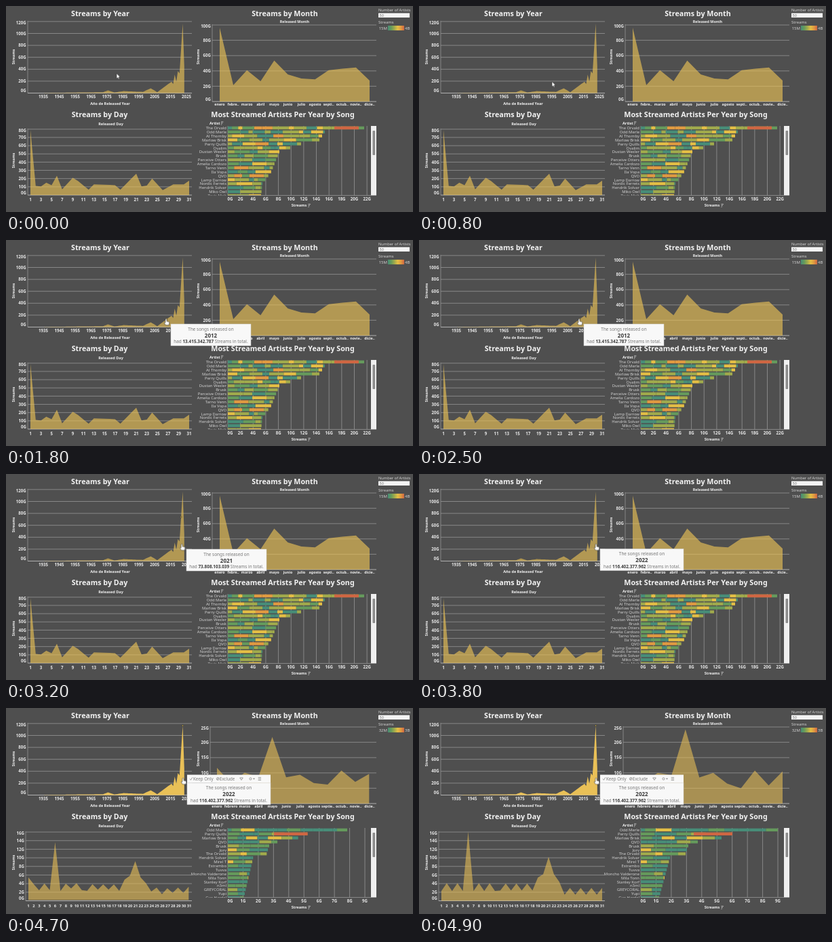
These frames come from a looping animation (600 px wide and 304 px high, 5000 ms). An HTML page:

```html
<!DOCTYPE html>
<html lang="en">
<head>
<meta charset="utf-8">
<title>Streams dashboard</title>
<style>
html, body { margin: 0; width: 100%; height: 100%; overflow: hidden; background: #4f4f4f; }
svg { display: block; width: 600px; height: 304px; font-family: "Noto Sans", "Open Sans", sans-serif; }
text { fill: #e8e8e8; }
.b { font-weight: 700; fill: #f2f2f2; }
.m { font-weight: 600; }
.dim { fill: #d2d2d2; }
.grid { stroke: #a0a0a0; stroke-width: .7; }
.axis { stroke: #c9c9c9; stroke-width: .8; }
.area { fill: #e9c057; fill-opacity: .65; }
.tip text { fill: #777; }
.tip .b { fill: #3c3c3c; }

#year { animation: lit 5s step-end infinite; }
.morph { animation: morph 5s linear infinite; }
.s0, .s1, .s2, .s01, .s12, .t1, .t2, .t3, .bar, .arrow, .hand { animation: 5s step-end infinite; }
.s0 { animation-name: s0; }
.s1 { animation-name: s1; }
.s2 { animation-name: s2; }
.s01 { animation-name: s01; }
.s12 { animation-name: s12; }
.t1 { animation-name: t1; }
.t2 { animation-name: t2; }
.t3 { animation-name: t3; }
.bar { animation-name: bar; }
.arrow { animation-name: arrow; }
.hand { animation-name: hand; }
.grow { transform-origin: 327px 0; animation: grow 5s ease-out infinite; }
#cursor { animation: move 5s linear infinite; }

@keyframes lit { 0% { fill-opacity: .65 } 90%, 100% { fill-opacity: 1 } }
@keyframes morph {
  0%, 85.9% { d: var(--p0); fill-opacity: .65 }
  85.95%, 88% { d: var(--p1); fill-opacity: .65; animation-timing-function: ease-in-out }
  97%, 100% { d: var(--p2); fill-opacity: .58 }
}
@keyframes s0 { 0% { opacity: 1 } 85.9%, 100% { opacity: 0 } }
@keyframes s1 { 0% { opacity: 0 } 85.9% { opacity: 1 } 92%, 100% { opacity: 0 } }
@keyframes s2 { 0% { opacity: 0 } 92%, 100% { opacity: 1 } }
@keyframes s01 { 0% { opacity: 1 } 92%, 100% { opacity: 0 } }
@keyframes s12 { 0% { opacity: 0 } 85.9%, 100% { opacity: 1 } }
@keyframes t1 { 0% { opacity: 0 } 31% { opacity: 1 } 58%, 100% { opacity: 0 } }
@keyframes t2 { 0% { opacity: 0 } 60% { opacity: 1 } 70%, 100% { opacity: 0 } }
@keyframes t3 { 0% { opacity: 0 } 70%, 100% { opacity: 1 } }
@keyframes bar { 0% { opacity: 0 } 90%, 100% { opacity: 1 } }
@keyframes arrow { 0% { opacity: 1 } 30%, 100% { opacity: 0 } }
@keyframes hand { 0% { opacity: 0 } 30%, 100% { opacity: 1 } }
@keyframes grow { 0%, 92% { transform: scaleX(.7) } 97%, 100% { transform: none } }
@keyframes move {
  0% { transform: translate(163px, 99.5px) }
  16% { transform: translate(196px, 111.5px) }
  30%, 54% { transform: translate(236px, 116.5px) }
  63% { transform: translate(259px, 103.5px) }
  72%, 100% { transform: translate(261px, 103.5px) }
}
</style>
</head>
<body>
<svg id="stage" viewBox="0 0 600 304"></svg>
<script>
const txt = (x, y, s, size = 6.1, cls = 'm', anchor = 'middle') =>
  `<text x="${x}" y="${y + size * .36}" font-size="${size}" class="${cls}" text-anchor="${anchor}">${s}</text>`;
const title = (x, y, s) => txt(x, y, s, 10.73, 'b');
const side = (x, y) => `<g transform="translate(${x} ${y}) rotate(-90)">${txt(0, 0, 'Streams', 5.5, 'b')}</g>`;
const line = (x1, y1, x2, y2, cls = 'grid') => `<path class="${cls}" d="M${x1} ${y1}L${x2} ${y2}"/>`;
const box = (x, y, w, h, fill, extra = '') =>
  `<rect x="${x}" y="${y}" width="${w}" height="${h}" fill="${fill}" ${extra}/>`;
const group = (cls, body) => `<g class="${cls}">${body}</g>`;
const list = (n, f) => Array.from({ length: n }, (_, i) => f(i));
const range = (n, f) => list(n, f).join('');

// Value at x on the straight lines between key points [x, value].
function between(keys, x) {
  const i = Math.max(1, keys.findIndex(k => k[0] >= x));
  const [x0, v0] = keys[i - 1], [x1, v1] = keys[i];
  return v0 + (v1 - v0) * (x - x0) / (x1 - x0);
}

function seeded(seed) {
  return () => (seed = (seed * 16807) % 2147483647) / 2147483647;
}

// Horizontal grid with labels; the end labels sit inside the plot.
function yAxis(x1, x2, y0, gap, n, step, labelX) {
  return range(n + 1, i => {
    const y = y0 - i * gap, shift = i === 0 ? -3.5 : i === n ? 2 : 0;
    return line(x1, y, x2, y, i ? 'grid' : 'axis') + txt(labelX, y + shift, i * step + 'G', 6.1, 'm', 'end');
  }) + line(x1, y0, x1, y0 - n * gap - 1);
}

function areaPath(values, x1, x2, y0, k) {
  const step = (x2 - x1) / (values.length - 1);
  const pts = values.map((v, i) => `L${(x1 + i * step).toFixed(1)} ${(y0 - v * k).toFixed(1)}`);
  return `M${x1} ${y0}${pts.join('')}L${x2} ${y0}Z`;
}
const morph = paths =>
  `<path class="area morph" d="${paths[0]}" style="${paths.map((p, i) => `--p${i}:path('${p}')`).join(';')}"/>`;

function yearChart() {
  const keys = [[1935, .3], [1972, 1.5], [1975, 4.5], [1979, 1], [1985, 3.3], [1997, 2], [2002, 8],
    [2006, 1.5], [2012, 13.4], [2015, 19], [2016, 15], [2017, 31], [2018, 19], [2019, 37], [2020, 33],
    [2021, 73.8], [2022, 116.4], [2023, 45]];
  const d = areaPath(list(89, i => between(keys, 1935 + i)), 56.4, 262.8, 128.5, .88);
  return title(139, 10.9, 'Streams by Year') + side(11.5, 75) +
    yAxis(32, 274, 128.5, 17.6, 6, 20, 29.7) + `<path id="year" class="area" d="${d}"/>` +
    range(10, i => txt(55 + i * 23.45, 134, 1935 + i * 10)) +
    txt(153.5, 144, 'Año de Released Year', 5.5, 'b');
}

function monthChart() {
  const short = 'enero febre.. marzo abril mayo junio julio agosto septi.. octub.. novie.. dicie..'.split(' ');
  const long = 'enero febrero marzo abril mayo junio julio agosto septie.. octub.. novie.. dicie..'.split(' ');
  const all = [96.5, 21.5, 41, 26.5, 53.5, 35.5, 30, 29, 41, 43, 44.5, 27.5];
  const one = [8, 7, 10, 9.3, 24.2, 8.5, 10, 6.5, 5, 10.8, 5.9, 10.5];
  const part = (cls, left, x1, x2, step, names) => group(cls,
    yAxis(left, x2 + 10, 141, 22.6, 5, step, left - 2) +
    range(12, i => txt(x1 + i * (x2 - x1) / 11, 145.2, names[i], 5.3, 'b')));
  return title(411, 10.9, 'Streams by Month') + txt(425.5, 23.5, 'Released Month', 5.4, 'b') + side(283, 75) +
    part('s0', 304, 315, 536, 20, short) + part('s1', 301, 311, 533, 20, short) +
    part('s2', 301, 311, 536, 5, long) +
    morph([areaPath(all, 315, 536, 141, 1.13), areaPath(all, 311, 533, 141, 1.13),
      areaPath(one, 311, 536, 141, 4.52)]);
}

function dayChart() {
  const keys = [[1, 79], [2, 11], [3, 10.5], [4, 15], [5, 12], [6, 23.5], [7, 7], [9, 21], [10, 17], [12, 6.5],
    [13, 13], [17, 12], [18, 6.5], [21, 26], [22, 10.5], [23, 11.5], [24, 20], [26, 6], [28, 13], [30, 13], [31, 17.5]];
  const all = list(31, i => between(keys, i + 1));
  // A zigzag with one sharp spike and one wide bump.
  const one = list(31, i => {
    const zig = (i % 2 ? 1 : -1) * (i < 11 ? .9 : -.8);
    const bump = Math.max(0, 6.2 - 2.4 * Math.abs(i - 20));
    return (i < 22 ? 3.2 : 2.2) + zig + bump + (i === 5 ? 12 : 0);
  });
  const odd = x => range(16, i => txt(x + i * 15.6, 286, i * 2 + 1));
  return title(138, 160.5, 'Streams by Day') + txt(154.5, 174, 'Released Day', 5.5, 'b') + side(11.5, 228) +
    group('s0', yAxis(32, 274, 279, 12.15, 8, 10, 30) + odd(36)) +
    group('s1', yAxis(29, 271, 279, 12.15, 8, 10, 30) + odd(33)) +
    group('s2', yAxis(29, 274, 284.5, 12.68, 8, 2, 27) + range(31, i => txt(33 + i * 7.9, 291.5, i + 1, 5.8))) +
    morph([areaPath(all, 36, 270, 279, 1.215), areaPath(all, 33, 267, 279, 1.215),
      areaPath(one, 33, 270, 284.5, 6.34)]);
}

const hues = { t: '#478d78', g: '#659a5c', l: '#a0aa4c', y: '#e3be45', o: '#e09a41', r: '#cf6643' };
const allTime = {
  names: ['The Orvald', 'Odd Merle', 'Al Thornby', 'Marlow Brisk', 'Perry Quills', 'Ovalim', 'Dustan Wexler',
    'Brusk', 'Perceive Otters', 'Amelia Cardozo', 'Tarno Venn', 'Ila Vopa', 'QVO', 'Lamp Darrow',
    'Nordic Ferrets', 'Hendrik Solvar', 'Miko Owl', 'Tavis Molt'],
  widths: [[0, 201], [1, 143], [3, 135], [4, 108], [6, 76], [11, 64], [14, 51], [17, 49]],
  mix: 'tttggglllyyyo', seed: 77, hot: { row: 0, from: 157, to: 193 }
};
const oneYear = {
  names: ['Odd Merle', 'Perry Quills', 'Marlow Brisk', 'QVO', 'Brusk', 'Jorv', 'The Orvald', 'Hendrik Solvar',
    'Mirel T', 'Estrambo', 'Tuvva', 'Moncho Valderone', 'Mila Tonn', 'Stanley Korf', 'n3ml', 'GREYCORAL',
    'Yupi', 'Gus Hardel'],
  widths: [[0, 202], [1, 135], [2, 119], [3, 84], [4, 70], [6, 66], [7, 43], [17, 27]],
  mix: 'ttttttggggly', seed: 411, hot: { row: 1, from: 78, to: 135 }
};

// Stacked bars: random segments in each row, one long red segment per table.
function rows({ names, widths, mix, seed, hot }, cls) {
  const rnd = seeded(seed);
  return names.map((name, i) => {
    const y = 180 + i * 5.88, width = between(widths, i);
    const seg = (x, w, hue) => box(327 + x, y - 2.3, w, 4.4, hues[hue]);
    let bars = '';
    for (let x = 0, w; x < width; x += w) {
      w = Math.min(6 + rnd() * 18, width - x);
      bars += seg(x, w, mix[Math.floor(rnd() * mix.length)]);
    }
    if (i === hot.row) bars += seg(hot.from, hot.to - hot.from, 'r');
    return txt(325, y, name, 5.9, 'dim', 'end') + group(cls, bars);
  }).join('');
}
const sortIcon = (x, y) => `<path d="M${x} ${y - 2}h3.4M${x} ${y}h2.3M${x} ${y + 2}h1.1" stroke="#ddd" stroke-width=".8"/>`;

function artistChart() {
  const part = (cls, n, gap, step, data, rowCls) => group(cls, range(n, i => {
    const x = 327 + i * gap;
    return line(x, 177, x, 279.5) + txt(i ? x : 330.5, 284.5, i * step + 'G');
  }) + `<g clip-path="url(#rows)">${rows(data, rowCls)}</g>`);
  return title(408, 160.5, 'Most Streamed Artists Per Year by Song') +
    txt(300, 173, 'Artist', 5.6, 'b', 'start') + sortIcon(317, 173) +
    part('s01', 12, 18.65, 2, allTime, '') + part('s2', 10, 22.45, 1, oneYear, 'grow') +
    line(327, 279.5, 538, 279.5) + txt(432, 294.5, 'Streams', 5.5, 'b') + sortIcon(445.5, 294.5) +
    box(538, 177, 8, 102.5, '#efefef') + box(540.5, 184, 3.6, 36, '#8c8c8c', 'rx="1"');
}

function legend() {
  const ends = (a, b) => txt(562, 32.5, a, 6, 'dim', 'end') + txt(588, 32.5, b, 6, 'dim', 'start');
  return txt(549, 6, 'Number of Artists', 5.7, 'dim', 'start') + box(549, 10.5, 46, 6.5, '#f4f4f4') +
    `<text x="550.5" y="15.9" font-size="5.6" style="fill:#777">50</text>` +
    txt(549, 23.5, 'Streams', 5.9, 'dim', 'start') + box(563, 29, 24, 7, 'url(#ramp)') +
    group('s0', ends('15M', '4B')) + group('s12', ends('32M', '3B'));
}

function tip(cls, x, y, w, year, total) {
  const c = x + w / 2;
  return group('tip ' + cls, box(x, y, w, 32, '#f8f8f8', 'stroke="#d0d0d0" stroke-width=".5"') +
    txt(c, y + 7.5, 'The songs released on', 6.4, '') + txt(c, y + 17, year, 8, 'b') +
    txt(c, y + 26, `had <tspan class="b">${total}</tspan> Streams in total.`, 6.4, ''));
}
const dot = (cls, x, y) => `<circle class="${cls}" cx="${x}" cy="${y}" r="1.1" fill="#d8b84a" stroke="#333" stroke-width=".6"/>`;

const toolbar = group('tip bar', box(267, 98.5, 123, 12, '#f8f8f8') +
  txt(276, 104.5, 'Keep Only', 6.2, '', 'start') + txt(315, 104.5, 'Exclude', 6.2, '', 'start') +
  `<g fill="none" stroke="#777" stroke-width=".7"><path d="M271 104.5l1.4 1.8 2.4-4M311.3 106l2-3M344.7 103h4.6l-2.3 3.4zM371.7 102.5h4.4M371.7 104.5h4.4M371.7 106.5h4.4"/>
   <circle cx="312.3" cy="104.5" r="1.9"/><circle cx="360.5" cy="104.5" r="1.6"/></g>
   <path fill="#777" d="M364 103.7h3l-1.5 1.8z"/>`);

const cursor = `<g id="cursor" fill="#fff" stroke="#222" stroke-width=".5">
  <path class="arrow" d="M0 0V7.6L1.8 6L3 8.6L4.2 8L3 5.5H5.4Z"/>
  <path class="hand" d="M-1 .8a1 1 0 0 1 2 0V3.6L4 4.2Q5 4.5 4.8 5.6L4.2 9H-.6L-3 5.6Q-2.6 4.6-1 5.6Z"/></g>`;

document.getElementById('stage').innerHTML =
  `<defs><clipPath id="rows"><rect x="270" y="176" width="268" height="103.5"/></clipPath>
   <linearGradient id="ramp">${Object.values(hues).map((c, i) => `<stop offset="${i / 5}" stop-color="${c}"/>`).join('')}</linearGradient></defs>` +
  yearChart() + monthChart() + dayChart() + artistChart() + legend() +
  dot('t1', 237, 116.5) + dot('t2', 258, 63.5) + dot('bar', 260.5, 26) +
  tip('t1', 243, 124, 118, 2012, '13.415.342.787') +
  tip('t2', 266, 111, 118, 2021, '73.808.103.039') +
  tip('t3', 267, 110.5, 123, 2022, '116.402.377.962') + toolbar + cursor;
</script>
</body>
</html>
```
